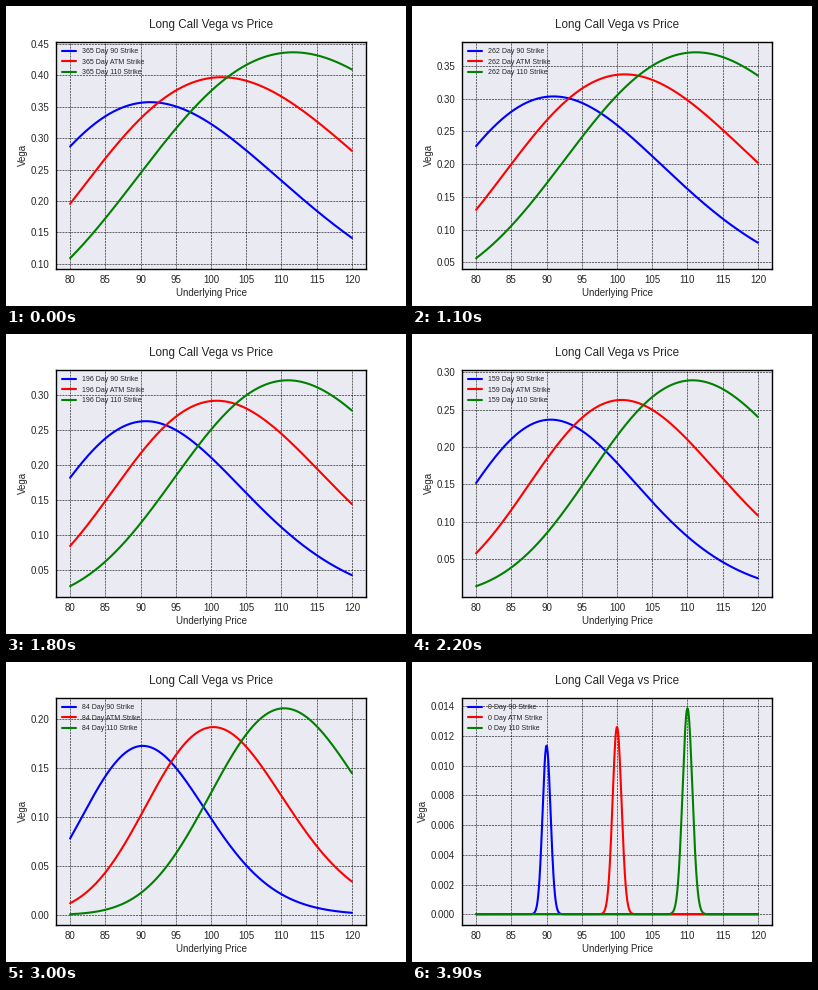
A matplotlib script that plays this animation: 400x300 px, repeating every 4 s.

```python
import numpy as np
import matplotlib.pyplot as plt
from matplotlib.animation import FuncAnimation

FRAMES = 40
RATE, VOL = 0.005, 0.2
STRIKES = [(90, "90", "blue"), (100, "ATM", "red"), (110, "110", "green")]

plt.rcParams.update({
    "font.family": "Liberation Sans",
    "font.size": 14,
    "text.color": "0.15",
    "axes.labelcolor": "0.15",
    "axes.titlesize": "large",
    "axes.titlepad": 20,
    "axes.facecolor": "#EAEAF2",
    "axes.edgecolor": "black",
    "axes.linewidth": 2,
    "axes.axisbelow": True,
    "axes.grid": True,
    "grid.color": "black",
    "grid.linestyle": "--",
    "grid.linewidth": 0.8,
    "lines.linewidth": 3,
    "lines.solid_capstyle": "round",
    "xtick.color": "0.15",
    "ytick.color": "0.15",
    "xtick.major.size": 0,
    "ytick.major.size": 0,
    "xtick.major.pad": 10,
    "ytick.major.pad": 10,
    "legend.fontsize": 10,
    "legend.frameon": False,
})

prices = np.linspace(80, 120, 1000)
years = np.linspace(1, 0.001, FRAMES)


def vega(strike, t):
    """Price change of the option per volatility point."""
    sd = VOL * np.sqrt(t)
    d1 = (np.log(prices / strike) + (RATE + VOL**2 / 2) * t) / sd
    density = np.exp(-d1**2 / 2) / np.sqrt(2 * np.pi)
    return prices * density * np.sqrt(t) / 100


def label(name, t):
    return f"{int(t * 365)} Day {name} Strike"


fig, ax = plt.subplots(figsize=(8, 6), dpi=50, facecolor="white")
fig.subplots_adjust(left=0.125, right=0.9, bottom=0.125, top=0.88)
ax.set_title("Long Call Vega vs Price")
ax.set_xlabel("Underlying Price")
ax.set_ylabel("Vega")

lines = [ax.plot(prices, vega(k, 1), color=color, label=label(name, 1))[0]
         for k, name, color in STRIKES]
legend = ax.legend(loc="upper left")


def update(i):
    t = years[i]
    for (k, name, _), line, text in zip(STRIKES, lines, legend.get_texts()):
        line.set_ydata(vega(k, t))
        text.set_text(label(name, t))
    ax.relim()
    ax.autoscale_view()
    return lines


anim = FuncAnimation(fig, update, frames=FRAMES, interval=100,
                     repeat=True, repeat_delay=0, blit=False)
plt.show()
```
